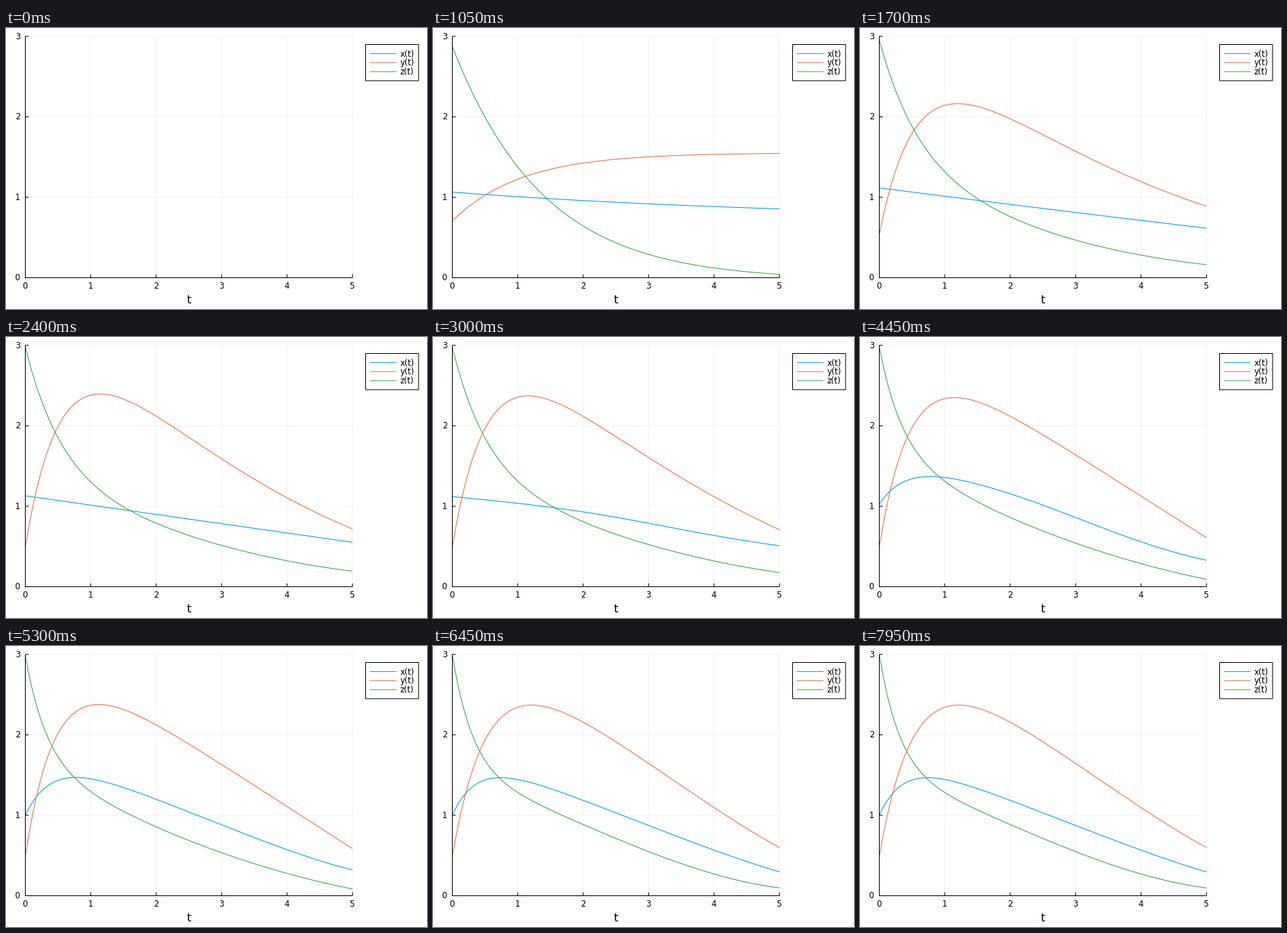
Write a matplotlib script that moves like this. It is 600x400 px and loops after 8 s.

```python
import numpy as np
import matplotlib.pyplot as plt
from matplotlib.animation import FuncAnimation
from matplotlib.patches import Rectangle

W, H, DPI = 600, 400, 100
FRAMES, STEP = 160, 50
PX = 72 / DPI
LEFT, RIGHT, TOP, BOTTOM = 27.5, 493.8, 11.9, 355.5
COLORS = ["#009AFA", "#E36F47", "#3EA44E"]
NAMES = ["x(t)", "y(t)", "z(t)"]

plt.rcParams["font.family"] = "DejaVu Sans"

t = np.linspace(0, 5, 301)
u = 5 - t
flare = (t / 5) ** 7


def fade(rate):
    return np.exp(-rate * t)


# Stages of the fit: each holds the curves x, y, z.
start = np.array([.12 - .05 * t,
                  .05 + .09 * t,
                  .35 - .03 * t])
rough = np.array([1 - .02 * t,
                  1.25 - .45 * fade(.8),
                  3.15 * fade(.55) - .22])
settling = np.array([.7 + .364 * fade(.17),
                     1.552 - .847 * fade(.95),
                     3.05 / (np.exp(.75 * t) + .05) - .03])
bent = np.array([1.13 - .1155 * t,
                 .72 + .3335 * u + .0545 * u ** 2 - 3.26 * fade(1.79),
                 .193 + .1 * u + .0285 * u ** 2 + 1.575 * fade(1.83)])
humped = np.array([.24 + (.87 + .09 * t) / (1 + np.exp(1.2 * (t - 3))),
                   3.17 - .5 * t - 2.67 * fade(1.88),
                   .112 + .174 * u + .025 * u ** 2 + 1.373 * fade(2.25)])
close = np.array([1.86 - .327 * t - .86 * fade(2.38) + .097 * flare,
                  3.21 - .525 * t - 2.725 * fade(2.15),
                  .084 + .162 * u + .0315 * u ** 2 + 1.3 * fade(3.1)])
final = np.array([1.826 - .318 * t - .826 * fade(2.57) + .062 * flare,
                  3.385 - .577 * t - 2.9 * fade(1.83) + .1 * flare,
                  1.51 - .25 * t - .049 * t ** 2 + .0085 * t ** 3
                  + 1.49 * fade(3.15)])

# (time in ms, stage, power of the ease leading to it; below 1 eases in)
KEYS = [(50, start, 1), (450, rough, 2), (1050, settling, 1), (2400, bent, 2.4),
        (3600, humped, .45), (5300, close, 1.8), (6450, final, 1.8)]


def stage(ms):
    for (t0, a, _), (t1, b, power) in zip(KEYS, KEYS[1:]):
        if ms <= t1:
            p = (ms - t0) / (t1 - t0)
            p = 1 - (1 - p) ** power if power >= 1 else p ** (1 / power)
            return a + (b - a) * p
    return KEYS[-1][1]


def sx(v):
    return LEFT + (RIGHT - LEFT) * v / 5


def sy(v):
    return BOTTOM - (BOTTOM - TOP) * v / 3


fig = plt.figure(figsize=(W / DPI, H / DPI), dpi=DPI, facecolor="white")
ax = fig.add_axes([0, 0, 1, 1])
ax.set_xlim(0, W)
ax.set_ylim(H, 0)
ax.axis("off")


def line(xs, ys, color="black", alpha=1, z=2, width=1.0):
    return ax.plot(xs, ys, color=color, alpha=alpha, lw=width * PX, zorder=z,
                   solid_capstyle="butt", snap=False)[0]


def label(x, y, text, size=8.4, ha="center"):
    ax.text(x, y, text, fontsize=size, ha=ha, va="baseline", color="black",
            zorder=6)


for i in range(6):
    x = sx(i)
    line([x, x], [TOP, BOTTOM], alpha=.06, z=1)
    line([x, x], [BOTTOM, BOTTOM - 4.8], z=4)
    label(x - .5, 371.2, str(i))
for i in range(4):
    y = sy(i)
    line([LEFT, RIGHT], [y, y], alpha=.06, z=1)
    line([LEFT, LEFT + 4.8], [y, y], z=4)
    label(20, y + 3.8, str(i), ha="right")
line([LEFT, LEFT], [TOP, BOTTOM + .5], z=4)
line([LEFT, RIGHT], [BOTTOM, BOTTOM], z=4)
label(260.6, 392, "t", size=11.6)

ax.add_patch(Rectangle((512.5, 23.5), 75.5, 51.5, fc="white", ec="black",
                       lw=PX, zorder=4, snap=False))
for i, (name, color) in enumerate(zip(NAMES, COLORS)):
    y = 36.4 + 12.85 * i
    line([518.7, 556.5], [y, y], color, z=5)
    label(562, y + 4.1, name, ha="left")

plot_area = Rectangle((LEFT, TOP - .5), RIGHT - LEFT, BOTTOM - TOP + 1,
                      transform=ax.transData)
curves = [line([], [], c, z=3, width=1.05) for c in COLORS]
for c in curves:
    c.set_clip_path(plot_area)


def draw(i):
    # The plot is empty on the first step.
    rows = stage(i * STEP) if i else np.full((3, t.size), np.nan)
    for c, row in zip(curves, rows):
        c.set_data(sx(t), sy(row))
    return curves


anim = FuncAnimation(fig, draw, frames=FRAMES, interval=STEP, repeat=True,
                     repeat_delay=0, init_func=lambda: draw(0), blit=False)
plt.show()
```
